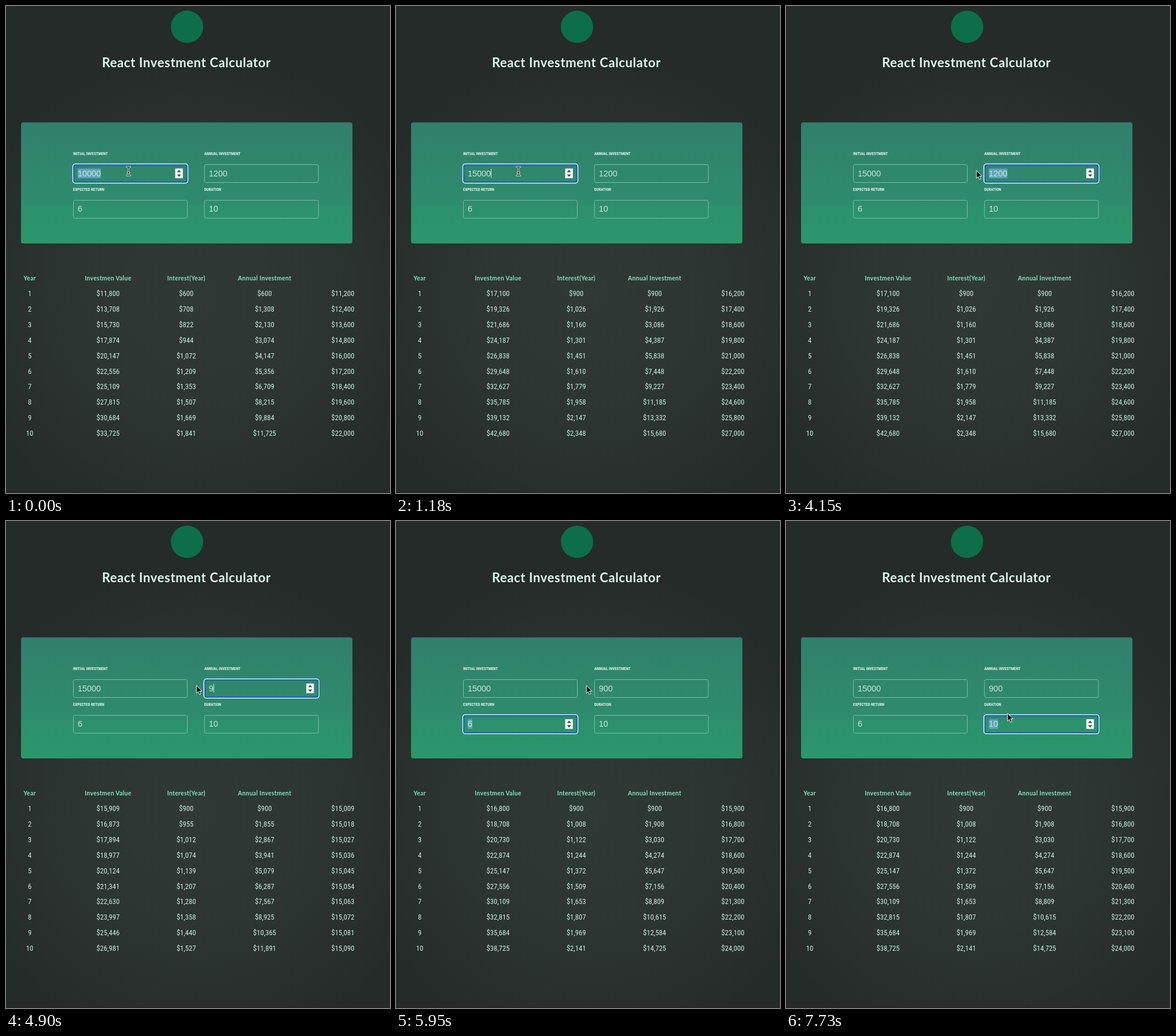
Recreate the animation shown at these times as an HTML page. Size 664x843 px, loop 8 s.

```html
<!DOCTYPE html>
<html lang="en">
<head>
<meta charset="utf-8">
<title>Investment Calculator</title>
<style>
  html, body { margin: 0; width: 100%; height: 100%; overflow: hidden; background: #252b29; }
  svg { display: block; width: 664px; height: 843px; }
  .title { font: 700 22px Lato, sans-serif; letter-spacing: .62px; fill: #def8ee; }
  .head { font: 700 10.4px Lato, sans-serif; letter-spacing: .3px; fill: #83e6c0; }
  .cell { font: 400 12.6px "Roboto Condensed", Roboto, sans-serif; font-stretch: 75%; fill: #c9efe3; }
  .label { font: 700 6.9px "Roboto Condensed", Roboto, sans-serif; font-stretch: 75%; fill: #e0f6ee; }
  .value { font: 400 14.4px "Liberation Sans", Arial, sans-serif; fill: #c6e8da; }
  .mid { text-anchor: middle; }
</style>
</head>
<body>
<svg id="stage" viewBox="0 0 664 843" xmlns="http://www.w3.org/2000/svg">
  <defs>
    <radialGradient id="glow" gradientUnits="userSpaceOnUse" cx="332" cy="500" r="420">
      <stop offset="0" stop-color="#303936"/>
      <stop offset=".5" stop-color="#2d3532"/>
      <stop offset="1" stop-color="#252b29"/>
    </radialGradient>
    <linearGradient id="panel" x1="0" y1="0" x2="0" y2="1">
      <stop offset="0" stop-color="#30806c"/>
      <stop offset=".68" stop-color="#2f8c6d"/>
      <stop offset=".69" stop-color="#2c916c"/>
      <stop offset="1" stop-color="#2b976d"/>
    </linearGradient>
  </defs>
  <rect width="664" height="843" fill="url(#glow)"/>
  <rect y="841.5" width="664" height="1.5" fill="#272225"/>
  <circle cx="313" cy="36" r="28" fill="#0c6e4b"/>
  <text class="title mid" x="312" y="106">React Investment Calculator</text>
  <rect x="26" y="201.5" width="573" height="209.5" rx="4" fill="url(#panel)"/>
</svg>
<script>
const NS = 'http://www.w3.org/2000/svg';
const stage = document.getElementById('stage');
const LOOP = 8000, DIGIT = 8.008, ROWS = 10;
const COLS = [41, 176.5, 311.7, 447.2, 582.5];

function add(tag, attrs, parent = stage, text = '') {
  const el = document.createElementNS(NS, tag);
  for (const k in attrs) el.setAttribute(k, attrs[k]);
  el.textContent = text;
  parent.appendChild(el);
  return el;
}
const set = (el, attrs) => { for (const k in attrs) el.setAttribute(k, attrs[k]); };
const show = (el, on) => el.setAttribute('visibility', on ? 'visible' : 'hidden');

function makeField(x, y, name) {
  add('text', { class: 'label', x, y: y - 16.3 }, stage, name);
  const g = add('g', { transform: `translate(${x} ${y})` });
  const border = add('rect', { x: .5, y: .5, width: 197, height: 31, rx: 3, fill: 'none', stroke: '#79c1a4' }, g);
  const ring = add('g', { fill: 'none' }, g);
  add('rect', { x: -.4, y: -.4, width: 198.8, height: 32.8, rx: 4, stroke: '#f4fbff', 'stroke-width': 1.5 }, ring);
  add('rect', { x: 1.2, y: 1.2, width: 195.6, height: 29.6, rx: 2.5, stroke: '#1459c8', 'stroke-width': 1.8 }, ring);
  const mark = add('rect', { y: 7.5, height: 16.5, fill: '#62a3bf' }, g);
  const value = add('text', { class: 'value', x: 8, y: 20.6 }, g);
  const caret = add('rect', { y: 8, width: 1, height: 15, fill: '#d3efe4' }, g);
  const spin = add('g', {}, g);
  add('rect', { x: 176.5, y: 7.3, width: 13.3, height: 16.8, fill: '#f1f3f2' }, spin);
  add('path', { d: 'M179.8 13.6l3.4-3.8 3.4 3.8zM179.8 17.8l3.4 3.8 3.4-3.8z', fill: '#3c4340' }, spin);
  return { border, ring, mark, value, caret, spin };
}

const fields = [
  makeField(116, 274, 'INITIAL INVESTMENT'),
  makeField(342.7, 274, 'ANNUAL INVESTMENT'),
  makeField(116, 335.8, 'EXPECTED RETURN'),
  makeField(342.7, 335.8, 'DURATION')
];

['Year', 'Investmen Value', 'Interest(Year)', 'Annual Investment'].forEach((name, i) =>
  add('text', { class: 'head mid', x: COLS[i], y: 475 }, stage, name));

const cells = Array.from({ length: ROWS }, (_, r) =>
  COLS.map(x => add('text', { class: 'cell mid', x, y: 502.2 + r * 26.88 })));

const beam = add('g', { fill: 'none', 'stroke-linecap': 'square' });
const beamPath = 'M-2.8-7.5h1.5L0-6.5 1.3-7.5h1.5M0-6.5v13M-2.8 7.5h1.5L0 6.5 1.3 7.5h1.5M-1.5 2.5h3';
add('path', { d: beamPath, stroke: '#f2f6f4', 'stroke-width': 2.6 }, beam);
add('path', { d: beamPath, stroke: '#14201c', 'stroke-width': 1.1 }, beam);
const arrow = add('path', {
  d: 'M0 0V13.4L3.1 10.5 5.2 15.4 7.6 14.4 5.5 9.6H9.7Z',
  fill: '#0b0d0c', stroke: '#f4f7f6', 'stroke-width': 1
});

// Each step changes part of the state: v values, f focus, h hover, s selection, c caret, p pointer
const typed = (i, text) => ({ i, text, s: null, c: true });
const steps = [
  [0, { v: ['10000', '1200', '6', '10'], f: 0, h: 0, s: [0, 5], c: false, p: ['beam', 211.7, 286] }],
  [290, typed(0, '1')],
  [440, typed(0, '15')],
  [740, typed(0, '150')],
  [1030, typed(0, '1500')],
  [1180, typed(0, '15000')],
  [1630, { c: false }],
  [2080, { c: true }],
  [2230, { h: -1, p: ['arrow', 322, 253] }],
  [2370, { h: 1, p: ['beam', 366, 300] }],
  [2520, { f: 1, p: ['beam', 381.5, 287] }],
  [3120, { c: false }],
  [3260, { p: ['beam', 393.5, 290] }],
  [3560, { c: true }],
  [3860, { s: [3, 4], c: false, p: ['beam', 376, 290] }],
  [4010, { s: [1, 4], p: ['beam', 356, 289] }],
  [4150, { s: [0, 4], h: -1, p: ['arrow', 329.2, 284.8] }],
  [4900, typed(1, '9')],
  [5050, typed(1, '90')],
  [5200, typed(1, '900')],
  [5800, { c: false }],
  [5950, { f: 2, s: [0, 1] }],
  [6990, { h: 1, p: ['beam', 344, 300] }],
  [7140, { h: -1, p: ['arrow', 356, 309] }],
  [7290, { p: ['arrow', 370, 321] }],
  [7430, { p: ['arrow', 383, 333] }],
  [7580, { f: 3, s: [0, 2] }]
];

function stateAt(t) {
  const state = {};
  for (const [at, change] of steps) {
    if (at > t) break;
    Object.assign(state, change);
    if (change.v) state.v = [...change.v];
    if (change.text) state.v[change.i] = change.text;
  }
  return state;
}

const money = n => '$' + Math.round(n).toLocaleString('en-US');

function fillTable([initial, annual, rate]) {
  let value = initial, total = 0;
  cells.forEach((row, r) => {
    const interest = value * rate / 100;
    total += interest;
    value += interest + annual;
    const texts = [r + 1, money(value), money(interest), money(total), money(initial + annual * (r + 1))];
    row.forEach((cell, i) => { cell.textContent = texts[i]; });
  });
}

function draw(t) {
  const { v, f, h, s, c, p } = stateAt(t);
  fields.forEach((field, i) => {
    const on = i === f;
    field.value.textContent = v[i];
    show(field.border, !on);
    show(field.ring, on);
    show(field.spin, on || i === h);
    show(field.caret, on && c);
    show(field.mark, on && s);
    set(field.caret, { x: Math.round(7.6 + v[i].length * DIGIT) });
    if (on && s) set(field.mark, { x: 8 + s[0] * DIGIT, width: (s[1] - s[0]) * DIGIT });
  });
  fillTable(v.map(Number));
  const [kind, x, y] = p;
  show(beam, kind === 'beam');
  show(arrow, kind === 'arrow');
  set(kind === 'beam' ? beam : arrow, { transform: `translate(${x} ${y})` });
}

const start = performance.now();
function tick() {
  draw((performance.now() - start) % LOOP);
  requestAnimationFrame(tick);
}
draw(0);
requestAnimationFrame(tick);
</script>
</body>
</html>
```
